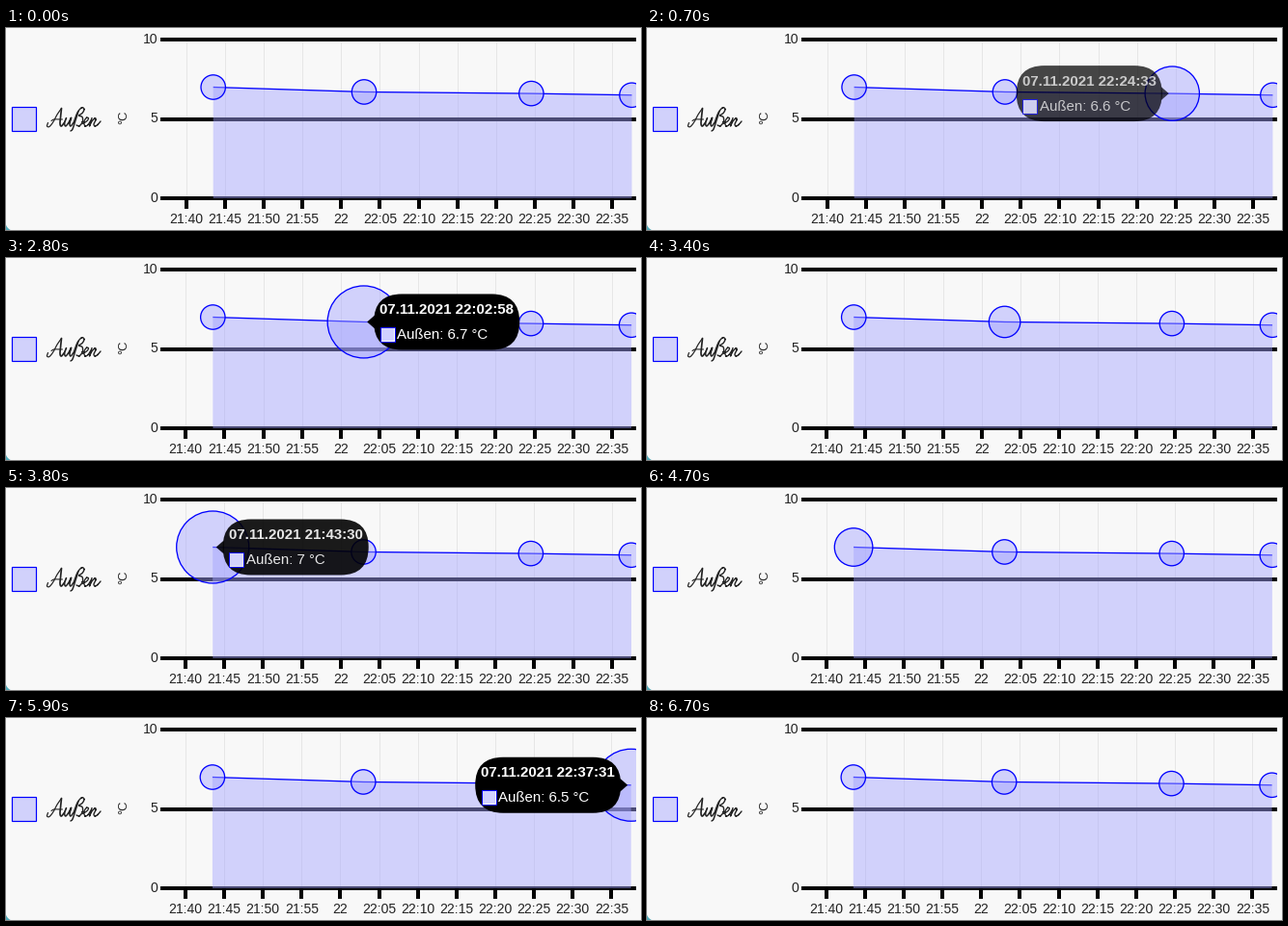
A matplotlib script for the animation above (6.8 s loop, 658 by 210 pixels).

```python
import numpy as np
import matplotlib.pyplot as plt
from matplotlib.animation import FuncAnimation
from matplotlib.patches import Circle, FancyBboxPatch, Polygon, Rectangle
from matplotlib.transforms import Affine2D

W, H, DPI = 658, 210, 100
FRAMES, STEP = 68, 100
PX = 72 / DPI                      # points per pixel
MINUTE = 8.03                      # pixels per minute on the time axis
X0 = 186.6                         # 21:40 at the start of the loop
SCROLL = MINUTE / 60000            # pixels per ms
R, R_HOVER = 12.7, 37.5
BLUE = "#0000ff"
FILL = (0.64, 0.64, 1, 0.46)
TIP_W, TIP_H, TIP_GAP = 151, 58, 10.5

plt.rcParams["font.family"] = "Liberation Sans"
fig = plt.figure(figsize=(W / DPI, H / DPI), dpi=DPI, facecolor="#f8f8f8")
ax = fig.add_axes([0, 0, 1, 1])
ax.set(xlim=(0, W), ylim=(H, 0))
ax.axis("off")
shift = Affine2D()
moving = shift + ax.transData
clip = Rectangle((160, 0), 492.5, H, transform=ax.transData)


def y_of(value):
    return 177 - 16.5 * value


def x_of(minutes):
    return X0 + MINUTE * minutes


def label(x, y, text, size=14, **kw):
    kw = {"color": "#222222", **kw}
    return ax.text(x, y, text, fontsize=size * PX, **kw)


def stroke(xs, ys, width, color="black", **kw):
    kw = {"solid_capstyle": "butt", **kw}
    return ax.plot(xs, ys, color=color, lw=width * PX, **kw)[0]


def smooth(points, n=10):
    """Catmull-Rom curve through the points."""
    p = np.array(points, float)
    p = np.vstack([2 * p[0] - p[1], p, 2 * p[-1] - p[-2]])
    t = np.linspace(0, 1, n)[:, None]
    parts = []
    for a, b, c, d in zip(p, p[1:], p[2:], p[3:]):
        parts.append(0.5 * (2 * b + (c - a) * t + (2 * a - 5 * b + 4 * c - d) * t**2
                            + (3 * b - a - 3 * c + d) * t**3))
    return np.vstack(parts).T


def ease_out(t):
    return 1 - (1 - min(max(t, 0), 1)) ** 4


def ramp(t):
    return min(max(t, 0), 1)


# Card corner
a = np.linspace(np.pi / 2, np.pi, 20)
corner = [(0, H)] + list(zip(9 + 9.5 * np.cos(a), 201.5 + 9.5 * np.sin(a)))
ax.add_patch(Polygon(corner, fc="#4fa9b8", ec="none"))

# Legend
ax.add_patch(Rectangle((5.5, 82), 25, 25, fc=FILL, ec=BLUE, lw=1.2 * PX))
SCRIPT = [
    (1.2, [(43.5, 98.5), (42.5, 102), (45, 102.5), (49, 97.5), (53, 90), (57.5, 83.5)]),
    (1.7, [(57.5, 83.5), (56.6, 92), (56, 99.5), (57.3, 102), (60, 99)]),
    (1.1, [(47, 96.5), (50, 95), (58.5, 95)]),
    (1.1, [(60, 99), (62.5, 93.5)]),
    (1.5, [(62.5, 93.5), (60.7, 99), (61.7, 102), (64.5, 99), (67.5, 93.5),
           (66, 99.5), (67, 102), (70, 98.5)]),
    (1.4, [(70, 98.5), (74, 88), (78.5, 82.8), (81, 84.5), (79, 88.5), (75.5, 91),
           (79, 92.5), (79.3, 97.5), (76, 101.8), (73, 101)]),
    (1.5, [(75, 86.5), (72, 96), (69, 105), (67, 107)]),
    (1.3, [(79, 99.5), (83.5, 97), (85.5, 94), (83.5, 93.3), (80.8, 97.5),
           (82, 102), (85, 100.5), (88, 96)]),
    (1.4, [(89, 93.5), (86.5, 102), (89, 97), (92.3, 93.8), (93, 95.5), (91, 100),
           (92.3, 102), (95, 100.5), (98, 97)]),
]
for width, points in SCRIPT:
    stroke(*smooth(points), width, "#222222", solid_capstyle="round")

# Axes and grid
label(122, 93, "°C", 13, rotation=90, ha="center", va="center")
for k in range(12):
    x, m = x_of(5 * k), 40 + 5 * k
    name = "22" if m == 60 else f"{21 + m // 60}:{m % 60:02d}"
    stroke([x, x], [14, 177], 1, "#e6e6e6", transform=moving, zorder=1)
    stroke([x, x], [177, 187.5], 4, transform=moving, zorder=2)
    label(x, 203, name, ha="center", transform=moving)
for value in (0, 5, 10):
    y = y_of(value)
    stroke([160, 652.5], [y, y], 4, zorder=2)
    label(157.5, y + 4, str(value), ha="right")

# Series: minutes after 21:40, value, clock, hover start and end,
# tooltip side, and where the tooltip slides in from
POINTS = [
    (3.5, "7", "21:43:30", 3625, 4450, 1, None),
    (22.97, "6.7", "22:02:58", 2300, 3100, 1, None),
    (44.55, "6.6", "22:24:33", 591, 1400, -1, None),
    (57.52, "6.5", "22:37:31", 5178, 6340, -1, 392),
]
xs = [x_of(p[0]) for p in POINTS]
ys = [y_of(float(p[1])) for p in POINTS]
area = [(xs[0], 177), *zip(xs, ys), (xs[-1], 177)]
ax.add_patch(Polygon(area, fc=FILL, ec="none", transform=moving, zorder=3))
stroke(xs, ys, 1.3, BLUE, transform=moving, zorder=4)
dots = []
for x, y in zip(xs, ys):
    dot = Circle((x, y), R, fc=FILL, ec=BLUE, lw=1.3 * PX, transform=moving, zorder=5)
    ax.add_patch(dot)
    dot.set_clip_path(clip)
    dots.append(dot)

# Tooltip
bubble = FancyBboxPatch((0, 0), TIP_W, TIP_H, fc="black", ec="none", zorder=8,
                        boxstyle="round,pad=0,rounding_size=29")
caret = Polygon(np.zeros((3, 2)), fc="black", ec="none", zorder=8)
swatch_bg = Rectangle((0, 0), 15, 15, fc="white", ec=BLUE, lw=PX, zorder=9)
swatch = Rectangle((0, 0), 13, 13, fc="#d1d1ff", ec="none", zorder=10)
for part in (bubble, caret, swatch_bg, swatch):
    ax.add_patch(part)
title = label(0, 0, "", 15, color="white", weight="bold", zorder=11)
body = label(0, 0, "", 15, color="white", zorder=11)
tip = (bubble, caret, swatch_bg, swatch, title, body)


def place_tip(x, y, side, alpha):
    top = y - TIP_H / 2
    bubble.set_bounds(x, top, TIP_W, TIP_H)
    edge = x if side > 0 else x + TIP_W
    caret.set_xy([(edge - 7 * side, y), (edge + side, y - 7), (edge + side, y + 7)])
    swatch_bg.set_xy((x + 6.5, top + 34.5))
    swatch.set_xy((x + 7.5, top + 35.5))
    title.set_position((x + 6, top + 20.5))
    body.set_position((x + 24, top + 46.5))
    for part in tip:
        part.set_alpha(alpha)
        part.set_visible(True)


def update(i):
    now = i * STEP
    dx = -SCROLL * now
    shift.clear().translate(dx, 0)
    for part in tip:
        part.set_visible(False)
    for dot, x, y, spec in zip(dots, xs, ys, POINTS):
        _, value, clock, start, end, side, origin = spec
        grow = ramp((now - start) / 175) * ramp(1 - (now - end) / 350)
        dot.set_radius(R + (R_HOVER - R) * grow)
        alpha = ease_out((now - start) / 400) * ramp(1 - (now - end) / 200)
        if alpha > 0:
            left = x + dx + (TIP_GAP if side > 0 else -TIP_GAP - TIP_W)
            if origin is not None:
                left = origin + (left - origin) * ease_out((now - start) / 400)
            title.set_text(f"07.11.2021 {clock}")
            body.set_text(f"Außen: {value} °C")
            place_tip(left, y, side, alpha)
    return [*dots, *tip]


anim = FuncAnimation(fig, update, frames=FRAMES, interval=STEP, repeat=True,
                     repeat_delay=0, blit=False)
plt.show()
```
